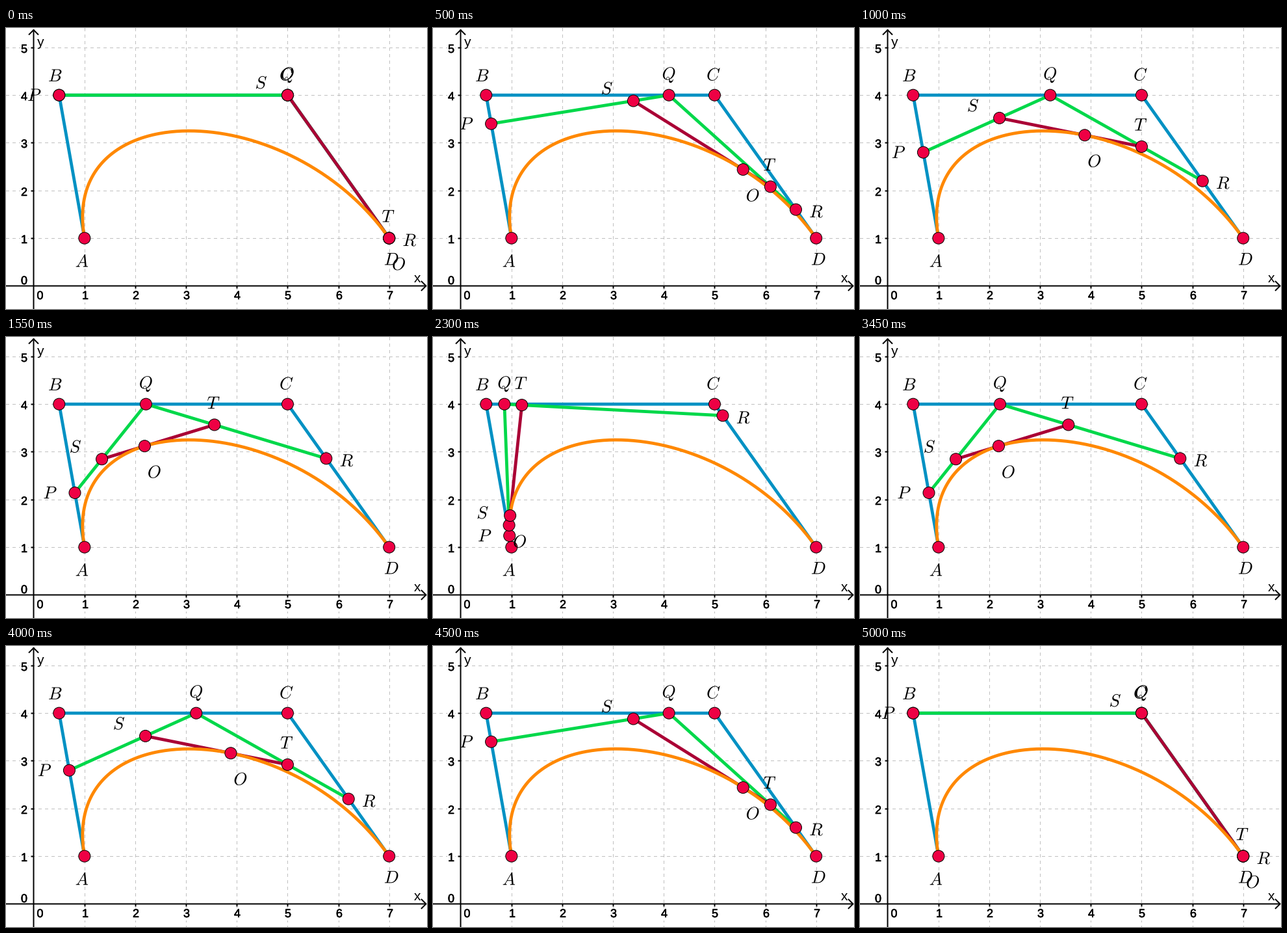
These frames come from a looping animation (648x432 px, 5050 ms). A matplotlib script:

```python
import numpy as np
import matplotlib.pyplot as plt
from matplotlib.animation import FuncAnimation
from matplotlib.patches import Circle, PathPatch
from matplotlib.patheffects import withStroke
from matplotlib.textpath import TextPath
from matplotlib.transforms import Affine2D

W, H = 648, 432
FRAMES, STEP_MS = 101, 50
X0, Y0, UX, UY = 42.7, 396.4, 78.15, 73.3

BLUE, GREEN, WINE, ORANGE = "#0091c3", "#00d84a", "#aa0035", "#ff8800"
DOT = "#ee0044"

plt.rcParams["font.family"] = "Liberation Sans"
plt.rcParams["mathtext.fontset"] = "cm"

fig = plt.figure(figsize=(W / 72, H / 72), dpi=72, facecolor="white")
ax = fig.add_axes([0, 0, 1, 1])
ax.set_xlim(0, W)
ax.set_ylim(H, 0)
ax.axis("off")


def to_px(p):
    return np.array([X0 + UX * p[0], Y0 - UY * p[1]])


def stroke(xs, ys, color="black", lw=2.0, z=2.0, **kw):
    kw.setdefault("snap", False)
    return ax.plot(xs, ys, color=color, lw=lw, zorder=z,
                   solid_capstyle="butt", **kw)[0]


def number(x, y, n):
    ax.text(x, y, str(n), size=18, ha="center", va="baseline", zorder=1.5,
            bbox=dict(fc="white", ec="none", pad=1),
            path_effects=[withStroke(linewidth=0.6, foreground="black")])


def draw_axes():
    grid = dict(color="#c0c0c0", lw=1, z=1, linestyle=(0, (5, 5)),
                dash_capstyle="butt")
    left, base = 42.5, 396.5
    for n in range(1, 8):
        x = round(X0 + UX * n) + 0.5
        stroke([x, x], [0, H], **grid)
        stroke([x, x], [base, base + 4])
        number(x + 0.5, 417, n)
    for n in range(1, 6):
        y = round(Y0 - UY * n) + 0.5
        stroke([0, W], [y, y], **grid)
        stroke([left - 4, left], [y, y])
        number(28, y + 7.5, n)
    number(52.5, 417, 0)
    number(28, 394, 0)

    stroke([0, W - 1], [base, base])
    stroke([left, left], [2, H])
    stroke([639, 646.5, 639], [base - 7.5, base, base + 7.5])
    stroke([left - 7.5, left, left + 7.5], [10.5, 3, 10.5])
    ax.text(633, 391, "x", size=21, ha="center", va="baseline", zorder=3)
    ax.text(53, 28, "y", size=21, ha="center", va="baseline", zorder=3)


class Point:
    """Dot with an italic letter whose centre sits at a fixed offset."""

    def __init__(self, name, offset, z):
        self.offset = np.array(offset)
        self.dot = Circle((0, 0), 9, fc=DOT, ec="black", lw=1, zorder=z)
        glyph = TextPath((0, 0), f"${name}$", size=27)
        box = glyph.get_extents()
        mid = (box.x0 + box.x1) / 2, (box.y0 + box.y1) / 2
        self.base = Affine2D().translate(-mid[0], -mid[1]).scale(1, -1)
        self.letter = PathPatch(glyph, fc="black", lw=0, zorder=z + 0.5)
        ax.add_patch(self.dot)
        ax.add_patch(self.letter)

    def place(self, p):
        x, y = to_px(p)
        self.dot.center = x, y
        move = Affine2D().translate(x + self.offset[0], y + self.offset[1])
        self.letter.set_transform(self.base + move + ax.transData)


def lerp(a, b, t):
    return a + (b - a) * t


def de_casteljau(t):
    pts = dict(fixed)
    for name, a, b in ("PAB", "QBC", "RCD", "SPQ", "TQR", "OST"):
        pts[name] = lerp(pts[a], pts[b], t)
    return pts


fixed = {name: np.array(p, float) for name, p in
         (("A", (1, 1)), ("B", (0.5, 4)), ("C", (5, 4)), ("D", (7, 1)))}
offsets = {
    "A": (-4, 34.5), "B": (-6, -30.5), "C": (-1.5, -32), "D": (3.5, 32),
    "P": (-38, -0.5), "Q": (0, -31), "R": (31.5, 3), "S": (-40.5, -19.5),
    "T": (-1.5, -34), "O": (15, 39.5),
}

draw_axes()
stroke(*to_px(np.array([fixed[n] for n in "ABCD"]).T), BLUE, 4.8, 4)
hull = stroke([], [], GREEN, 4.8, 4.1)
tangent = stroke([], [], WINE, 4.8, 4.2)
curve = np.array([de_casteljau(t)["O"] for t in np.linspace(0, 1, 200)])
stroke(*to_px(curve.T), ORANGE, 4.8, 4.3)
points = {name: Point(name, off, 5 + i)
          for i, (name, off) in enumerate(offsets.items())}


def update(i):
    pts = de_casteljau(abs(1 - i / 50))
    for name, point in points.items():
        point.place(pts[name])
    hull.set_data(*to_px(np.array([pts[n] for n in "PQR"]).T))
    tangent.set_data(*to_px(np.array([pts[n] for n in "ST"]).T))
    return []


anim = FuncAnimation(fig, update, frames=FRAMES, interval=STEP_MS,
                     init_func=lambda: update(0), repeat=True, repeat_delay=0)
plt.show()
```
